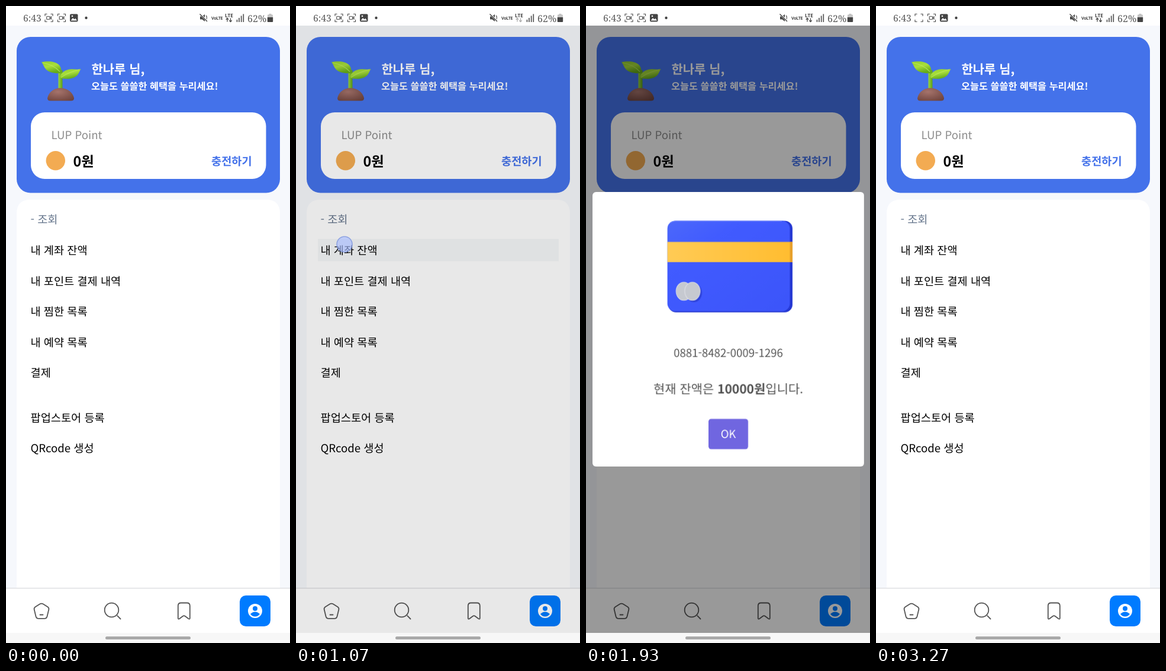
Write an HTML page that moves like this. It is 480 px wide and 1072 px high and loops after 3590 ms.

```html
<!DOCTYPE html>
<html lang="ko">
<head>
<meta charset="utf-8">
<title>내 정보</title>
<style>
html, body { margin: 0; width: 100%; height: 100%; overflow: hidden; background: #fff; }
svg { display: block; width: 100vw; height: 100vh; }
text { font: 400 18.64px "Noto Sans CJK KR", "Noto Sans CJK JP", "Noto Sans CJK", sans-serif; white-space: pre; text-rendering: geometricPrecision; }
.bold { font-weight: 700; }
.big { font-size: 20.97px; }
.status text { font-family: "Noto Serif", serif; font-weight: 300; fill: #555; }
.status .tiny { font: 700 8px "Noto Sans", sans-serif; fill: #444; }
.line { fill: none; stroke: #555; stroke-width: 1.8; stroke-linecap: round; stroke-linejoin: round; }
.thin { fill: none; stroke: #555; stroke-width: 1.2; }

.cam, .arrows, .row, .dim, .popup, .press, .touch { animation: 3590ms step-end infinite; }
.cam { animation-name: blink; }
.arrows { animation-name: traffic; }
.row { animation-name: row; }
.dim { animation-name: dim; }
.popup { animation-name: popup; transform-origin: 240.5px 544px; }
.press { animation-name: press; }
.touch { animation-name: touch; }

@keyframes blink {
  0%, 18.66%, 46.51%, 74.37% { opacity: 1; }
  5.57%, 33.42%, 61.28%, 89.13%, 100% { opacity: 0; }
}
@keyframes traffic {
  0%, 9.19%, 35.37%, 100% { opacity: 1; }
  3.62%, 25.9% { opacity: .45; }
}
@keyframes row {
  0%, 31.47%, 100% { opacity: 0; }
  27.85% { opacity: 1; }
}
@keyframes dim {
  0%, 91.08%, 100% { opacity: 0; }
  29.8% { opacity: .09; }
  31.47% { opacity: .385; }
  33.42% { opacity: .4; }
  87.18% { opacity: .28; }
  89.13% { opacity: .01; }
}
@keyframes popup {
  0%, 91.08%, 100% { opacity: 0; transform: none; }
  31.47% { opacity: 1; transform: scale(.896); }
  33.42% { opacity: 1; transform: scale(1.041); }
  35.37% { opacity: 1; transform: scale(.974); }
  37.04% { opacity: 1; transform: scale(.953); }
  38.99% { opacity: 1; transform: none; }
  87.18% { opacity: .82; transform: scale(.91); }
  89.13% { opacity: .11; transform: scale(.56); }
}
@keyframes press {
  0%, 89.13%, 100% { opacity: 0; }
  83.56% { opacity: 1; }
}
@keyframes touch {
  0%, 31.47%, 87.18%, 100% { opacity: 0; transform: translate(82px, 401px); }
  25.9% { opacity: 1; transform: translate(82px, 401px); }
  29.8% { opacity: .85; transform: translate(82px, 401px); }
  81.61% { opacity: 1; transform: translate(249px, 729px); }
  85.51% { opacity: .9; transform: translate(249px, 729px); }
}
</style>
</head>
<body>
<svg viewBox="0 0 480 1072" preserveAspectRatio="none">
  <defs>
    <linearGradient id="leaf" x1="0" y1="0" x2=".4" y2="1">
      <stop offset="0" stop-color="#8fce2c"/><stop offset=".5" stop-color="#a9de3c"/><stop offset="1" stop-color="#65ab1b"/>
    </linearGradient>
    <linearGradient id="stem">
      <stop offset="0" stop-color="#9bd83a"/><stop offset="1" stop-color="#5c9e1c"/>
    </linearGradient>
    <radialGradient id="soil" cx=".4" cy=".3" r=".8">
      <stop offset="0" stop-color="#a5736b"/><stop offset="1" stop-color="#6f443e"/>
    </radialGradient>
    <linearGradient id="face" x1="0" y1="0" x2="1" y2="1">
      <stop offset="0" stop-color="#4c68fb"/><stop offset=".3" stop-color="#415bff"/><stop offset="1" stop-color="#3c55fa"/>
    </linearGradient>
    <linearGradient id="band">
      <stop offset="0" stop-color="#ffcb55"/><stop offset="1" stop-color="#ffbd30"/>
    </linearGradient>
    <g id="corners" class="thin">
      <path d="M-6.5-3V-6.5H-3M3-6.5H6.5V-3M6.5 3V6.5H3M-3 6.5H-6.5V3"/>
    </g>
    <g id="camera" class="thin">
      <rect x="-3.8" y="-2.5" width="5.4" height="5" rx="1"/><path d="M1.6-.4 4-2V2L1.6 .4"/>
    </g>
  </defs>

  <rect width="480" height="1072" fill="#fff"/>
  <rect y="33" width="480" height="947" fill="#f6f8fc"/>

  <g class="status">
    <text x="29" y="26" style="font-size:15.6px">6:43</text>
    <use href="#corners" x="72.500" y="20"/>
    <g class="cam"><use href="#camera" x="72.500" y="20"/></g>
    <use href="#corners" x="94" y="20"/><use href="#camera" x="94" y="20"/>
    <rect x="108" y="13.500" width="13.500" height="13" rx="2" fill="#444"/>
    <path d="M109.500 24.500 113 20l2.500 2.500 1.800-1.800 2.700 3.800Z" fill="#fff"/><circle cx="112" cy="17" r="1.300" fill="#fff"/>
    <circle cx="135.500" cy="20" r="2.200" fill="#444"/>
    <path d="M328 17.500h3.500L336 14V26l-4.500-3.500H328Z" fill="#444"/>
    <path d="M338 16q3 3.500 0 7.500" class="thin"/>
    <path d="M328 13.500 340.500 26" stroke="#fff" stroke-width="3"/><path d="M327.500 13.500 340 26" stroke="#444" stroke-width="1.400"/>
    <text x="347" y="23" class="tiny" style="font-size:7.2px;letter-spacing:-.4px">VoLTE</text>
    <text x="370" y="18.500" class="tiny" style="font-size:8.3px">LTE</text>
    <g class="arrows" fill="none" stroke="#444" stroke-width="1.300">
      <path d="M374 26.500V20.500M371.800 22.700 374 20.500l2.200 2.200M379.500 20.500v6M377.300 24.300l2.200 2.200 2.200-2.200"/>
    </g>
    <path d="M390.500 27v-4M394 27v-7M397.700 27V16.500M401.300 27V13.500" stroke="#555" stroke-width="1.700"/>
    <text x="408" y="26.500" style="font-size:16px">62%</text>
    <path d="M444.500 13h4v1.500h1.500q1 0 1 1v10.500q0 1-1 1h-7q-1 0-1-1V15.500q0-1 1-1h1.500Z" fill="#c4c4c4"/>
    <path d="M441.800 19h9.400v7q0 1-1 1h-7.400q-1 0-1-1Z" fill="#444"/>
  </g>

  <rect x="18" y="52" width="445" height="262.500" rx="23.300" fill="#4472ea"/>
  <g>
    <path d="M88.500 108h7v36h-7Z" fill="url(#stem)"/>
    <path d="M60 94.500C70 92 84 93 89.500 99c3.500 4 4.500 8 3.500 14-10 1-21-1-26-7-3-3.500-4-8-7-11.500Z" fill="url(#leaf)"/>
    <path d="M91 121c1-7 6-12 14-14 7-2 15 1 21.500-1-3 5-4 10-9 13-8 5-18 4-26.500 2Z" fill="url(#leaf)"/>
    <path d="M62 95.500q18 3 29 15M124 107q-15 3-31 13" fill="none" stroke="#c6ee63" stroke-width="1.200" opacity=".7"/>
    <path d="M70 155c2-10 11-17 22-17s21 7 23 17q0 4.500-5 4.500H75q-5 0-5-4.500Z" fill="url(#soil)"/>
  </g>
  <text x="144.500" y="114" class="bold big" fill="#fff">한나루 님,</text>
  <text x="144" y="141" class="bold" style="font-size:16.31px" fill="#fff">오늘도 쓸쓸한 혜택을 누리세요!</text>
  <rect x="42" y="179" width="397.500" height="112" rx="23.300" fill="#fff"/>
  <text x="76.500" y="224" fill="#8c8c8c">LUP Point</text>
  <circle cx="83.800" cy="260.300" r="16.200" fill="#f3ab52"/>
  <text x="113.500" y="269.700" class="bold" style="font-size:23.3px">0원</text>
  <text x="347" y="268" class="bold" fill="#4472ea">충전하기</text>

  <path d="M18 980V349.300Q18 326 41.300 326H439.700Q463 326 463 349.300V980Z" fill="#fff"/>
  <rect class="row" x="37" y="392" width="407" height="37.500" fill="#f5f7f8"/>
  <text x="41.500" y="366" fill="#64748b">- 조회</text>
  <text x="41.500" y="418">내 계좌 잔액</text>
  <text x="41.500" y="469.600">내 포인트 결제 내역</text>
  <text x="41.500" y="521.200">내 찜한 목록</text>
  <text x="41.500" y="572.700">내 예약 목록</text>
  <text x="41.500" y="624.300">결제</text>
  <text x="41.500" y="699.500">팝업스토어 등록</text>
  <text x="41.500" y="751">QRcode 생성</text>

  <rect y="979" width="480" height="76" fill="#fff"/>
  <rect y="979" width="480" height="1.500" fill="#dfe0e3"/>
  <g class="line">
    <path d="M57.500 1006.300q2.500-1.300 5 0l8 5q2.500 1.800 1.800 4.500l-2.800 11.500q-.8 3.500-4.500 3.500H55q-3.700 0-4.500-3.500L47.700 1015.800q-.7-2.700 1.800-4.500ZM57.500 1024.500h5"/>
    <circle cx="178.500" cy="1016.500" r="11.800"/><path d="M188.200 1026.200l5.300 5.300"/>
    <path d="M290.800 1009.500q0-5 5-5h10q5 0 5 5v20.500q0 2.500-2.200 1.300l-6-4.600q-1.800-1.300-3.600 0l-6 4.600q-2.200 1.200-2.200-1.300Z"/>
  </g>
  <rect x="395" y="992" width="52" height="52" rx="10.500" fill="#007bff"/>
  <circle cx="421" cy="1018" r="12" fill="#fff"/>
  <circle cx="421" cy="1014" r="4" fill="#007bff"/>
  <path d="M413 1023.300q3.500-3.800 8-3.800t8 3.800q-3 4.200-8 4.200t-8-4.200Z" fill="#007bff"/>

  <rect class="dim" y="33" width="480" height="1022"/>
  <rect y="1055" width="480" height="17" fill="#f7f7f7"/>
  <rect x="168" y="1061" width="144" height="5" rx="2.500" fill="#a9a9a9"/>

  <g class="popup">
    <rect x="11" y="313" width="459" height="462" rx="5.800" fill="#fff"/>
    <rect x="139" y="361.500" width="210" height="154" rx="13" fill="#2336d2"/>
    <rect x="137.500" y="361.500" width="207" height="152" rx="13" fill="url(#face)"/>
    <path d="M142 365q4-3 9-3h180" fill="none" stroke="#6f86ff" stroke-width="1.200"/>
    <rect x="137.500" y="397" width="211.500" height="34" fill="url(#band)"/>
    <rect x="344.500" y="397" width="4.500" height="34" fill="#e7a02b"/>
    <ellipse cx="182.500" cy="482.500" rx="13.500" ry="16" fill="#2a3ccf" opacity=".75"/>
    <g fill="#c6c9d0" stroke="#e1e3e8">
      <ellipse cx="165.300" cy="480" rx="13" ry="15.300"/>
      <ellipse cx="179.800" cy="480" rx="13" ry="15.300"/>
    </g>
    <g fill="#545454" text-anchor="middle">
      <text x="240.500" y="591">0881-8482-0009-1296</text>
      <text x="240.500" y="652" class="big">현재 잔액은 <tspan class="bold">10000원</tspan>입니다.</text>
    </g>
    <rect x="207" y="694.800" width="67" height="51" rx="4.600" fill="#7066e0"/>
    <text x="240.500" y="727.500" text-anchor="middle" fill="#fff" style="font-weight:500">OK</text>
    <rect class="press" x="207" y="694.800" width="67" height="51" rx="4.600" fill="#cfd0ea" fill-opacity=".84"/>
    <text class="press" x="240.500" y="727.500" text-anchor="middle" fill="#fff" style="font-weight:500">OK</text>
  </g>

  <circle class="touch" r="13" fill="#a9beff" fill-opacity=".78" stroke="#7f97e0" stroke-width="1.600"/>
</svg>
</body>
</html>
```
